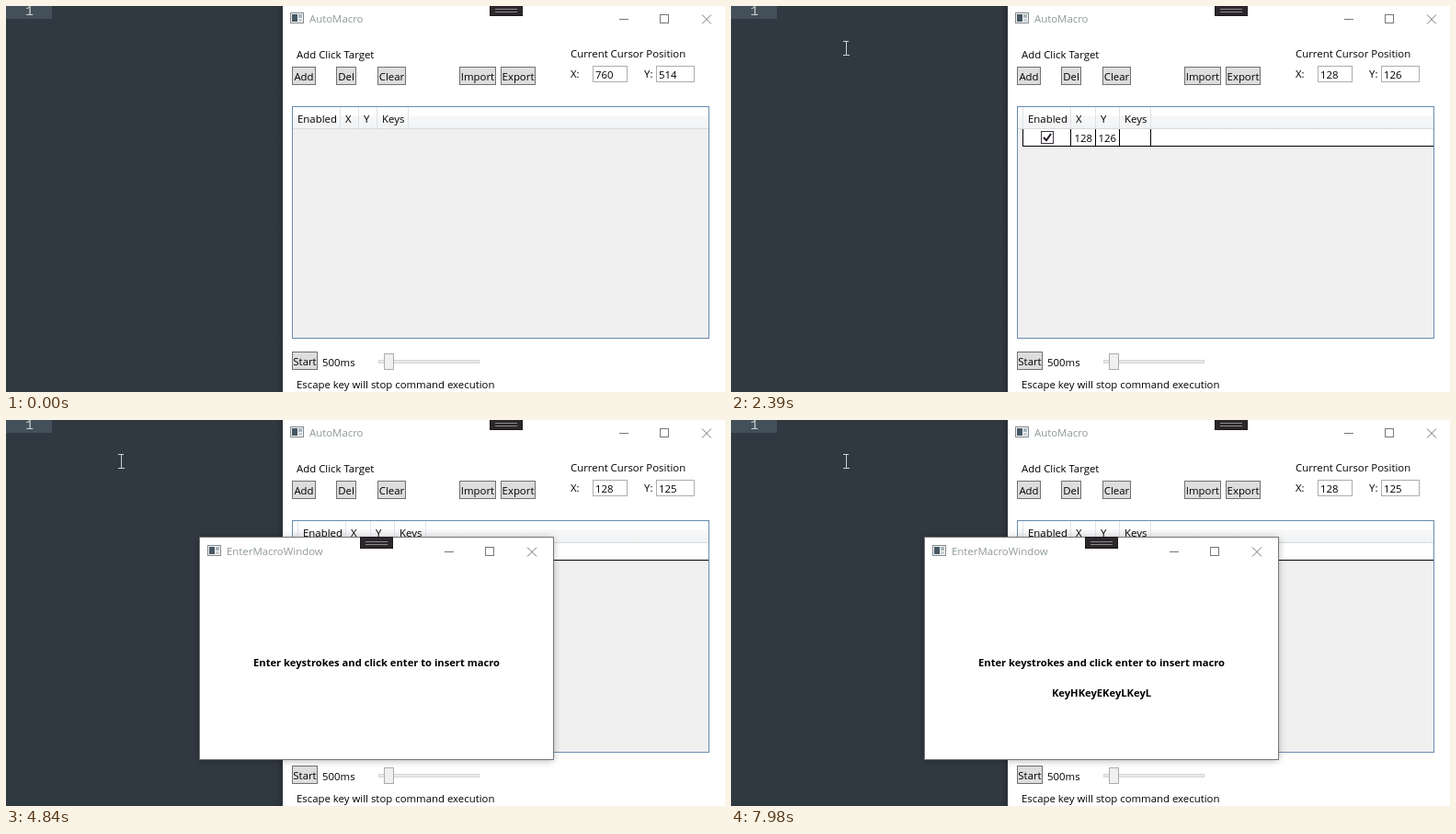
An HTML page that plays this animation: 782x420 px, repeating every 8 s.

```html
<!DOCTYPE html>
<html lang="en">
<head>
<meta charset="utf-8">
<title>Macro recorder</title>
<style>
  html, body { margin: 0; width: 100%; height: 100%; overflow: hidden; background: #303841; }
  svg { display: block; width: 782px; height: 420px; font: 11.4px "Open Sans", sans-serif; }
  text { white-space: pre; }
  rect, .line { shape-rendering: crispEdges; }
  .line { fill: none; }
  .bold { font-weight: 700; font-size: 11.2px; text-anchor: middle; }
</style>
</head>
<body>
<svg id="stage" viewBox="0 0 782 420"></svg>
<script>
const LOOP = 8000;

const text = (x, y, s, attrs = '') => `<text x="${x}" y="${y}" ${attrs}>${s}</text>`;
const rect = (x, y, w, h, fill, attrs = '') =>
  `<rect x="${x}" y="${y}" width="${w}" height="${h}" fill="${fill}" ${attrs}/>`;
// Filled box with a one pixel border inside its bounds
const box = (x, y, w, h, fill, border) =>
  rect(x + .5, y + .5, w - 1, h - 1, fill, `stroke="${border}"`);
const line = (d, color) => `<path class="line" d="${d}" stroke="${color}"/>`;
const group = (id, content, attrs = '') => `<g id="${id}" ${attrs}>${content}</g>`;

const button = (x, y, w, label) =>
  box(x, y, w, 20, '#ddd', '#707070') + text(x + w / 2, y + 15, label, 'text-anchor="middle"');

function titleBar(x, y, w, title) {
  const right = x + w, mid = y + 16.5;
  return box(x + 8, y + 9, 15, 12, '#f4f6f7', '#85898c')
    + rect(x + 10, y + 11, 6, 8, '#465864')
    + rect(x + 17, y + 11, 4, 4, '#a9b6bd') + rect(x + 17, y + 16, 4, 3, '#c9d0d4')
    + text(x + 29, y + 20, title, 'fill="#8f9b95"')
    + line(`M${right - 119} ${mid - .0}h10`, '#777')
    + line(`M${right - 74.5} ${mid - 5}h9v9h-9z`, '#777')
    + `<path d="M${right - 29} ${mid - 5}l10 10m0 -10l-10 10" stroke="#777" fill="none"/>`;
}

const handle = (x, y) =>
  box(x, y, 36, 13, '#2b272b', '#1c191c') + line(`M${x + 6} ${y + 5.5}h24m0 3h-24`, '#8d8a8d');

function tableHeader(columns, edges) {
  return rect(312, 110, 452, 24, 'url(#header)')
    + line('M312 133.5H764', '#d8dadc')
    + edges.map(x => line(`M${x + .5} 110V133`, '#dfe3e8')).join('')
    + ['Enabled', 'X', 'Y', 'Keys'].map((s, i) => text(columns[i], 127, s)).join('');
}

const row = rect(312, 134, 6, 19, '#f4f4f4') + rect(318, 134, 446, 19, '#fff')
  + line('M317.5 134V152.5H764M369.5 134V153M396.5 134V153M422.5 134V153M456.5 134V153', '#000')
  + box(337, 136, 14, 14, '#fff', '#40353f')
  + '<path d="M340 143l3 3.2l5 -7.2" fill="none" stroke="#1c1720" stroke-width="2"/>'
  + text(373.5, 148, '128') + text(399.5, 148, '126');

const field = (x, id) => box(x, 65, x < 700 ? 38 : 42, 18, '#fff', '#abadb3')
  + text(x + 3, 79, '', `id="${id}"`);

const editor = rect(0, 0, 301, 420, '#303841') + rect(0, 0, 50, 14, '#434f59')
  + text(21, 10, '1', 'fill="#c8ced1" style="font:15px \'Liberation Mono\',monospace"')
  + rect(293, 0, 8, 420, 'url(#edge)');

const mainWindow = rect(301, 0, 481, 420, '#fff')
  + titleBar(301, -2, 485, 'AutoMacro') + handle(525.5, -2)
  + text(316, 57, 'Add Click Target') + text(614, 56, 'Current Cursor Position')
  + button(311, 66, 26, 'Add') + button(359, 66, 22, 'Del') + button(404, 66, 31, 'Clear')
  + button(493, 66, 40, 'Import') + button(538, 66, 38, 'Export')
  + text(614, 78, 'X:') + field(638, 'posX') + text(694, 78, 'Y:') + field(707, 'posY')
  + box(311, 109, 454, 253, '#f0f0f0', '#688caf')
  + group('emptyTable', tableHeader([317, 369, 389, 409], [363, 383, 403, 437]))
  + group('filledTable', tableHeader([323, 375, 402, 428], [317, 369, 396, 422, 456]) + row)
  + button(311, 376, 28, 'Start') + text(344, 391.5, '500ms')
  + box(405, 385, 110, 4, '#e7eaea', '#d6d6d6') + box(411, 378, 11, 18, '#f0f0f0', '#acacac')
  + text(316, 416, 'Escape key will stop command execution');

const popup = rect(211, 128, 384, 241, '#fff', 'filter="url(#shadow)"')
  + box(210, 127, 386, 243, '#fff', '#777')
  + titleBar(211, 127, 385, 'EnterMacroWindow')
  + group('popupHandle', handle(385, 127))
  + text(403, 268, 'Enter keystrokes and click enter to insert macro', 'class="bold"')
  + text(403, 301, '', 'class="bold" id="keys"');

const arrow = '<path d="M.5 .5v16l3.7-3.6l2.5 5.6l2.3-1l-2.5-5.4h5z" fill="#fff" stroke="#000"/>';
const beam = line('M-3 -7.5h2.5h1h2.5M.5 -7.5V7.5M-3 7.5h7', '#cdd2d6');

document.getElementById('stage').innerHTML = `<defs>
  <linearGradient id="header" x2="0" y2="1">
    <stop offset=".38" stop-color="#fff"/><stop offset=".4" stop-color="#f7f8f9"/>
    <stop offset="1" stop-color="#f1f2f4"/>
  </linearGradient>
  <linearGradient id="edge">
    <stop stop-color="#000" stop-opacity="0"/><stop offset="1" stop-color="#000" stop-opacity=".15"/>
  </linearGradient>
  <filter id="shadow" x="-10%" y="-10%" width="120%" height="120%">
    <feDropShadow dx="0" dy="1" stdDeviation="4.5" flood-opacity=".35"/>
  </filter></defs>`
  + editor + mainWindow + group('popup', popup) + group('arrow', arrow) + group('beam', beam);

const el = id => document.getElementById(id);
const show = (id, on) => el(id).setAttribute('display', on ? 'inline' : 'none');
const write = (id, s) => { if (el(id).textContent !== s) el(id).textContent = s; };

// The pointer is sampled in 14 hops on its way to the editor
function pointer(t) {
  const hop = t < 190 ? 0 : Math.min(14, Math.floor((t - 190) / 66.6) + 1);
  const u = hop / 14, p = .8 * u + 1.4 * u * u - 1.2 * u ** 3;
  return [Math.round(757 - 632 * p), Math.round(434 - 388 * p) - (t >= 2650 ? 1 : 0)];
}

function draw(t) {
  const [x, y] = pointer(t), added = t >= 2390, open = t >= 4840;
  for (const id of ['arrow', 'beam']) el(id).setAttribute('transform', `translate(${x} ${y})`);
  show('arrow', x >= 301);
  show('beam', x < 301);

  show('emptyTable', !added);
  show('filledTable', added);
  write('posX', added ? '128' : '760');
  write('posY', !added ? '514' : t < 3310 ? '126' : '125');

  show('popup', t >= 4760);
  show('popupHandle', open);
  el('popup').setAttribute('opacity', open ? 1 : .11);
  el('popup').setAttribute('transform',
    open ? '' : 'translate(402 247.5) scale(.953) translate(-403 -248.5)');
  const typed = [6850, 7190, 7720, 7980].filter(at => t >= at).length;
  write('keys', [...'HELL'].slice(0, typed).map(k => 'Key' + k).join(''));
}

const start = performance.now();
function frame() {
  draw((performance.now() - start) % LOOP);
  requestAnimationFrame(frame);
}
frame();
</script>
</body>
</html>
```
